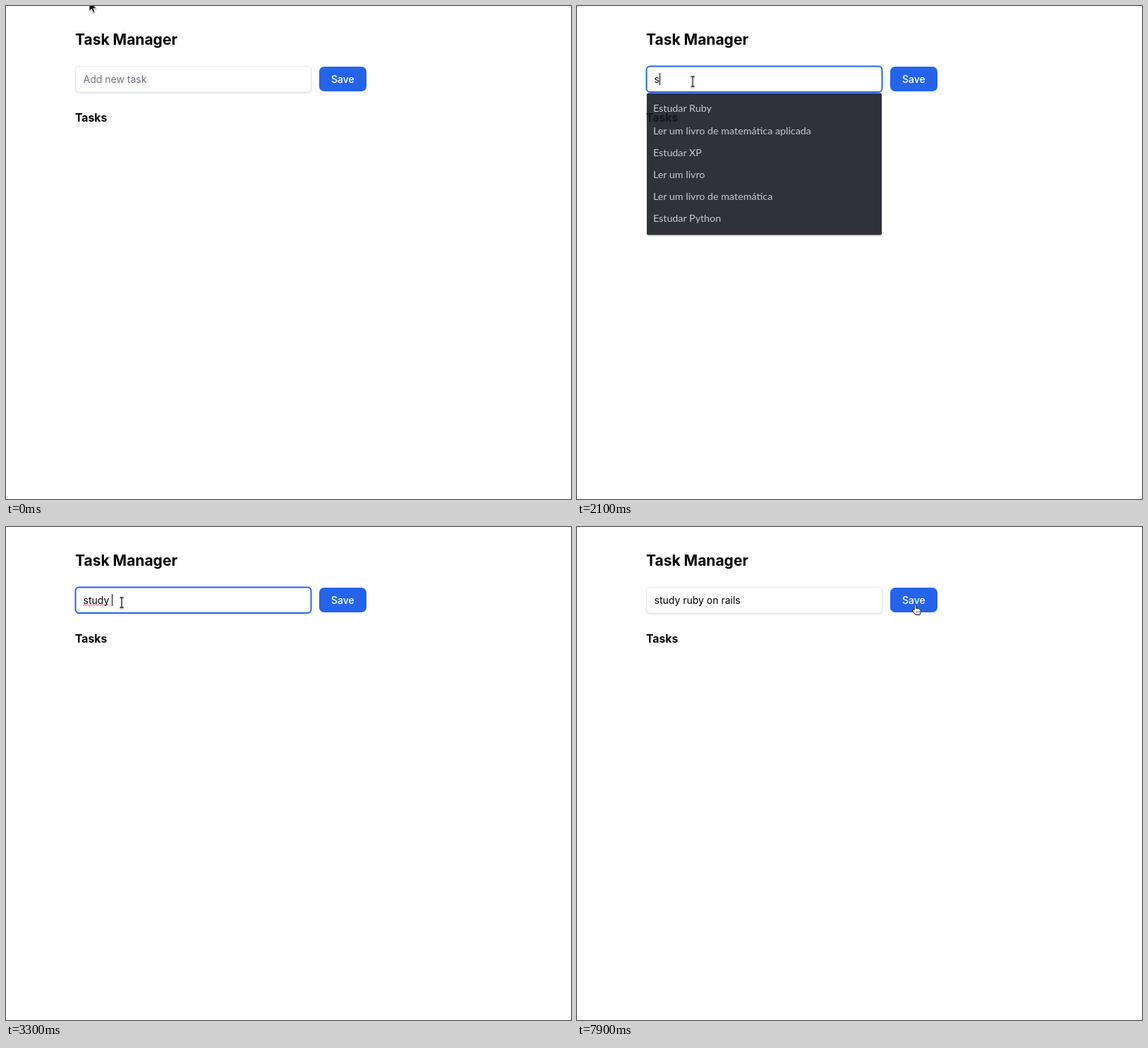
Recreate the animation shown at these times as an HTML page. Size 801x699 px, loop 8000 ms.

```html
<!DOCTYPE html>
<html lang="en">
<head>
<meta charset="utf-8">
<title>Task Manager</title>
<style>
  html, body { margin: 0; width: 100%; height: 100%; overflow: hidden; background: #fff; }
  svg { display: block; width: 801px; height: 699px; font-family: Inter, sans-serif; font-size: 14px; }
  .title { font-size: 21px; font-weight: 700; }
  .subtitle { font-size: 15.75px; font-weight: 700; }
  .field { fill: #fff; stroke: #e5e7eb; filter: drop-shadow(0 1px 1px rgba(0, 0, 0, .14)); }
  .ring { fill: #fff; stroke: #2563eb; stroke-width: 2; }
  .hint { fill: #6b7280; }
  .save { fill: #fff; font-weight: 500; text-anchor: middle; }
  .menu { transform-origin: 265.5px 224px; filter: drop-shadow(0 1px 1px rgba(0, 0, 0, .35)); }
  .menu text { font: 14.4px Lato, sans-serif; fill: #c3c4c9; }
  .wave { fill: none; stroke: #e5262b; stroke-width: .9; }
  .cursor { filter: drop-shadow(.5px 1px .7px rgba(0, 0, 0, .35)); }
</style>
</head>
<body>
<svg viewBox="0 0 801 699">
  <text class="title" x="98" y="55">Task Manager</text>
  <text class="subtitle" x="98" y="164">Tasks</text>
  <rect id="field" class="field" x="98.5" y="85.5" width="334" height="36.5" rx="5"/>
  <rect id="ring" class="ring" x="98.5" y="85.5" width="334" height="36.5" rx="5"/>
  <text id="hint" class="hint" x="109.5" y="109">Add new task</text>
  <text id="typed" x="109.5" y="109"></text>
  <path id="wave" class="wave"/>
  <rect id="caret" y="95" width="1" height="17"/>
  <rect x="444" y="86" width="67" height="35" rx="7" fill="#2563eb"/>
  <text class="save" x="477.3" y="109">Save</text>
  <g id="menu" class="menu">
    <rect x="98" y="123" width="335" height="202" rx="2" fill="#161824"/>
  </g>
  <g id="arrow" class="cursor">
    <path d="M0 0V14.2L3.4 11.2 5.6 16.6 8 15.6 5.8 10.4H10.2Z" fill="#111" stroke="#fff" stroke-width=".9"/>
  </g>
  <g id="beam" class="cursor" fill="none">
    <path d="M-2.5-7H2.5M-2.5 7H2.5M0-7V7" stroke="#fff" stroke-width="3"/>
    <path d="M-2.5-7H2.5M-2.5 7H2.5M0-7V7" stroke="#222" stroke-width="1.3"/>
  </g>
  <g id="hand" class="cursor">
    <path d="M-1.2 7V1.2Q-1.2 0 0 0T1.2 1.2V5Q2.3 4 3.4 5.2 4.6 4.4 5.6 5.8 7.6 5.4 7.6 7.6V10Q7.6 12 6.6 13.6H.6Q-1.5 11.6-3.8 8.6-4.4 7-2.8 6.6Q-1.8 6.4-1.2 7Z" fill="#fff" stroke="#222" stroke-width="1"/>
    <path d="M1.6 8.5V11M3.6 8.5V11M5.6 8.5V11" stroke="#222" stroke-width=".7"/>
  </g>
</svg>
<script>
  const LOOP = 8000, STEP = 100, LEFT = 109.5, BLUR = 7900;
  const PHRASE = "study ruby on rails";
  const TASKS = ["Estudar Ruby", "Ler um livro de matemática aplicada", "Estudar XP",
    "Ler um livro", "Ler um livro de matemática", "Estudar Python"];

  // Time at which each character of the phrase appears
  const KEYS = [2000, 2300, 2800, 2900, 3000, 3300, 3600, 3900, 4300, 4400,
    4700, 5400, 5700, 5800, 5900, 6200, 6300, 6500, 6600];
  // Misspelt words: start, end
  const WORDS = [[0, 5], [6, 10], [11, 13]];
  // Caret is hidden from, until
  const BLINKS = [[0, 800], [1400, 2000], [5300, 5400], [7200, LOOP]];
  // Menu state from a time on: opacity, scale
  const MENU = [[0, 0, 1], [800, 1, 1], [2100, .89, .994], [2200, .38, .967], [2300, 0, 1]];
  // Pointer from a time on: shape, x, y
  const POINTER = [
    [0, "arrow", 118, -7], [100, "arrow", 123, 16], [200, "arrow", 136, 60],
    [300, "beam", 152, 108], [400, "beam", 160, 118], [500, "beam", 162, 109.5],
    [1300, "beam", 164, 107], [7200, "beam", 174, 107], [7300, "beam", 215, 106],
    [7400, "beam", 290, 106], [7500, "beam", 370, 108], [7600, "hand", 450, 110],
    [7700, "hand", 486, 111], [7800, "hand", 481, 111], [7900, "hand", 479.5, 110.5]];

  const $ = id => document.getElementById(id);
  const show = (id, on) => $(id).style.display = on ? "" : "none";
  const latest = (list, t) => list.filter(item => item[0] <= t).pop();

  const pen = document.createElement("canvas").getContext("2d");
  pen.font = "14px Inter, sans-serif";
  const xAt = n => LEFT + pen.measureText(PHRASE.slice(0, n)).width;

  function squiggle([from, to]) {
    const end = xAt(to);
    let d = "";
    for (let x = xAt(from), up = 0; x <= end; x += 2, up ^= 1)
      d += `${d ? "L" : "M"}${x.toFixed(1)} ${up ? 109.7 : 111.5}`;
    return d;
  }

  TASKS.forEach((task, i) => {
    const row = document.createElementNS("http://www.w3.org/2000/svg", "text");
    row.setAttribute("x", 107);
    row.setAttribute("y", 150 + i * 31.3);
    row.textContent = task;
    $("menu").append(row);
  });

  function draw(t) {
    const count = KEYS.filter(key => key <= t).length;
    const focused = t >= 800 && t < BLUR;
    show("ring", focused);
    show("field", !focused);
    show("hint", !count);
    $("typed").textContent = PHRASE.slice(0, count);
    $("wave").setAttribute("d", focused ? WORDS.filter(w => w[1] < count).map(squiggle).join("") : "");
    show("caret", !BLINKS.some(([from, to]) => t >= from && t < to));
    $("caret").setAttribute("x", Math.round(xAt(count)));

    const [, opacity, scale] = latest(MENU, t);
    show("menu", opacity);
    $("menu").style.opacity = opacity;
    $("menu").style.transform = `scale(${scale})`;

    const [, shape, x, y] = latest(POINTER, t);
    for (const id of ["arrow", "beam", "hand"]) show(id, id === shape);
    $(shape).setAttribute("transform", `translate(${x} ${y})`);
  }

  const start = performance.now();
  function tick() {
    const t = (performance.now() - start) % LOOP;
    draw(Math.floor(t / STEP) * STEP);
    requestAnimationFrame(tick);
  }
  tick();
</script>
</body>
</html>
```
